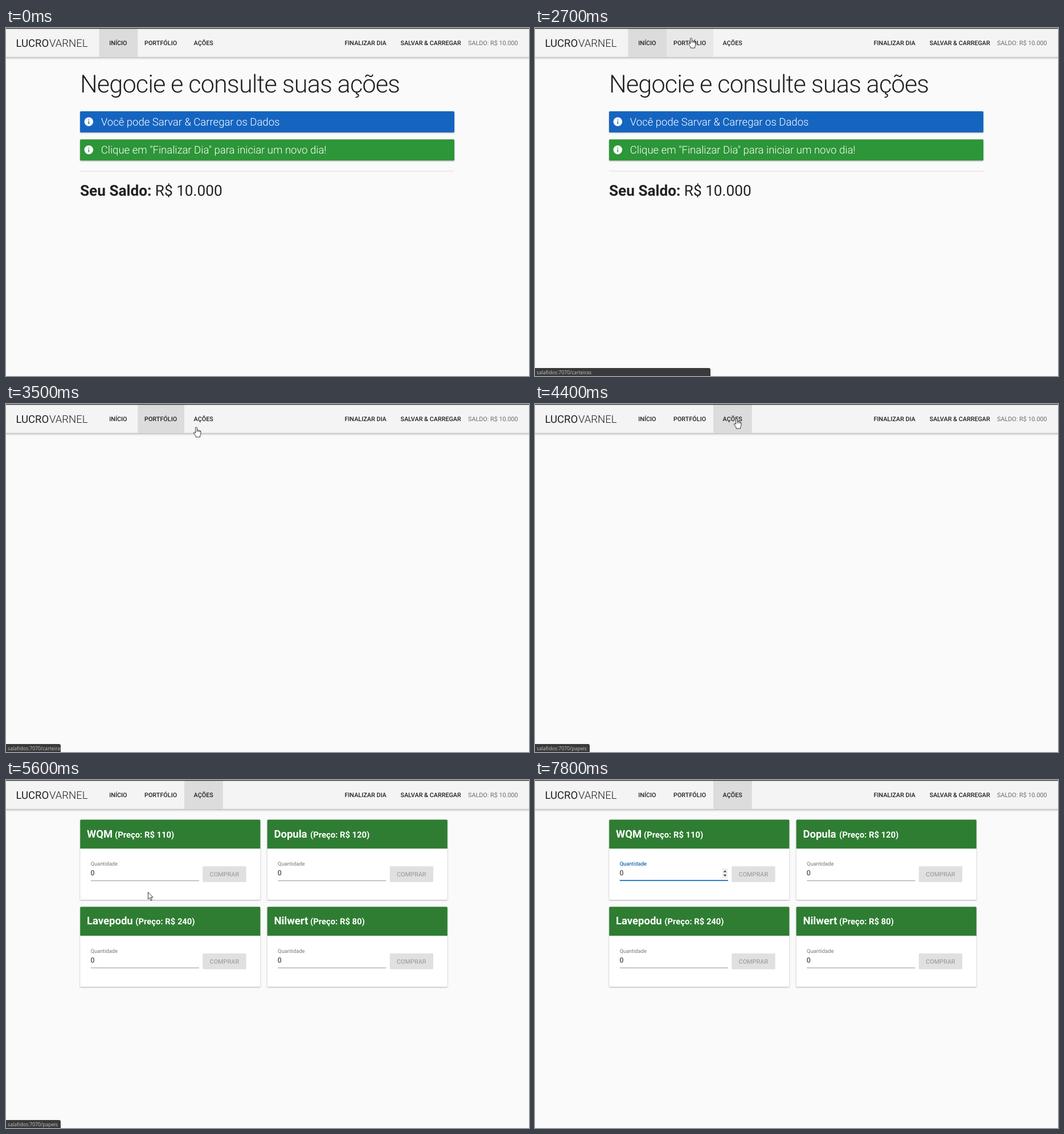
These frames come from a looping animation (918x610 px, 8000 ms). An HTML page:

```html
<!DOCTYPE html>
<html lang="pt">
<head>
<meta charset="utf-8">
<title>Carteira de ações</title>
<style>
html, body { margin: 0; width: 100%; height: 100%; overflow: hidden; background: #fafafa; }
#stage { position: relative; width: 918px; height: 610px; overflow: hidden; background: #fafafa; }
svg { position: absolute; left: 0; top: 0; font-family: Roboto, sans-serif; text-rendering: geometricPrecision; white-space: pre; }

.light { font-weight: 300; }
.bold { font-weight: 700; }
.ink { fill: #212121; }
.nav { font-size: 10.8px; font-weight: 500; }
.alert { font-size: 18.5px; font-weight: 300; fill: #fff; }
.name { font-size: 18.5px; font-weight: 700; fill: #fff; }
.price { font-size: 14.8px; font-weight: 700; fill: #fff; }
.label { font-size: 9.25px; fill: rgba(0,0,0,.54); }
.digit { font-size: 12.3px; fill: rgba(0,0,0,.87); }
.raised { filter: drop-shadow(0 1.4px 1px rgba(0,0,0,.32)); }
.bar { filter: drop-shadow(0 1.5px 2px rgba(0,0,0,.38)); }

/* 100 ms = 1.25% of the loop */
.home, .cards, .tab, .ripple, .cursor, .arrow, .hand, .focus, .line, .caret, .spin, .first,
#status, #status span { animation: 8s step-end infinite; }

.home { animation-name: leave; }
@keyframes leave {
  0% { opacity: 1; transform: none; }
  35% { opacity: .87; transform: translateY(-3px); }
  36.25% { opacity: .43; transform: translateY(-13.3px); }
  37.5%, 100% { opacity: 0; transform: translateY(-23px); }
}
.cards { animation-name: enter; }
@keyframes enter {
  0% { opacity: 0; transform: translateY(-23px); }
  56.25% { opacity: .46; transform: translateY(-12.5px); }
  57.5% { opacity: .84; transform: translateY(-3.5px); }
  58.75%, 100% { opacity: 1; transform: none; }
}

.tab { fill: #dcdcdc; }
.t1 { animation-name: tab1; }
@keyframes tab1 {
  0% { opacity: 1; }
  35% { opacity: .8; }
  36.25% { opacity: .38; }
  37.5%, 100% { opacity: 0; }
}
.t2 { animation-name: tab2; }
@keyframes tab2 {
  0% { opacity: 0; }
  33.75% { opacity: .5; }
  35% { opacity: 1; }
  52.5% { opacity: .75; }
  53.75% { opacity: .3; }
  55%, 100% { opacity: 0; }
}
.t3 { animation-name: tab3; }
@keyframes tab3 {
  0% { opacity: 0; }
  45% { opacity: .4; }
  46.25%, 100% { opacity: 1; }
}
.t4 { animation-name: tab4; }
@keyframes tab4 {
  0% { opacity: 0; }
  21.25% { opacity: .5; }
  22.5% { opacity: .17; }
  23.75%, 100% { opacity: 0; }
}
.ripple { fill: #a9a9a9; }
.r2 { animation-name: ripple2; }
@keyframes ripple2 {
  0% { opacity: 0; }
  35% { opacity: .5; }
  36.25% { opacity: 1; }
  37.5%, 100% { opacity: 0; }
}
.r3 { animation-name: ripple3; }
@keyframes ripple3 {
  0% { opacity: 0; }
  51.25% { opacity: .5; }
  52.5% { opacity: 1; }
  53.75% { opacity: .5; }
  55%, 100% { opacity: 0; }
}

.cursor { animation-name: path; }
@keyframes path {
  0% { transform: translate(17px, -14.5px); }
  6.25% { transform: translate(17px, -14.5px); animation-timing-function: steps(4); }
  11.25% { transform: translate(300px, 162px); animation-timing-function: steps(5); }
  17.5% { transform: translate(881px, 28px); }
  18.75% { transform: translate(881px, 28px); animation-timing-function: steps(3); }
  22.5% { transform: translate(741px, 52px); animation-timing-function: steps(3); }
  26.25% { transform: translate(440px, 53px); animation-timing-function: steps(2); }
  28.75% { transform: translate(254px, 30px); }
  30% { transform: translate(274px, 17px); }
  38.75% { transform: translate(274px, 17px); animation-timing-function: steps(4); }
  43.75% { transform: translate(334px, 40px); animation-timing-function: steps(2); }
  46.25% { transform: translate(354px, 25px); }
  65% { transform: translate(353px, 35px); }
  66.25% { transform: translate(353px, 35px); animation-timing-function: steps(3); }
  70% { transform: translate(249px, 196px); animation-timing-function: steps(4); }
  75%, 100% { transform: translate(157px, 163px); }
}
.arrow { animation-name: arrow; }
@keyframes arrow {
  0% { opacity: 1; }
  27.5% { opacity: 0; }
  67.5% { opacity: 1; }
  73.75%, 100% { opacity: 0; }
}
.hand { animation-name: hand; }
@keyframes hand {
  0% { opacity: 0; }
  27.5% { opacity: 1; }
  67.5%, 100% { opacity: 0; }
}

#status {
  position: absolute; left: 0; top: 596px; height: 14px; overflow: hidden;
  background: #3a3a3c; border-radius: 0 3px 0 0; color: #c4c4c4;
  font: 8.7px/16px "Open Sans", "Noto Sans", sans-serif; white-space: nowrap;
  animation-name: status;
}
#status span { position: absolute; left: 3px; top: 0; }
@keyframes status {
  0% { opacity: 0; width: 308px; }
  33.75% { opacity: 1; width: 308px; }
  40% { opacity: 1; width: 308px; animation-timing-function: steps(2); }
  42.5% { opacity: 1; width: 96px; }
  72.5% { opacity: .5; width: 96px; }
  73.75%, 100% { opacity: 0; width: 96px; }
}
#status .u1 { animation-name: url1; }
#status .u2 { animation-name: url2; }
@keyframes url1 { 0% { opacity: 1; } 45%, 100% { opacity: 0; } }
@keyframes url2 { 0% { opacity: 0; } 45%, 100% { opacity: 1; } }

.focus { fill: #1976d2; animation-name: focus; }
@keyframes focus {
  0% { opacity: 0; }
  78.75% { opacity: 0; animation-timing-function: steps(4); }
  83.75%, 100% { opacity: 1; }
}
.line { fill: #1976d2; transform-box: fill-box; transform-origin: center; animation-name: line; }
@keyframes line {
  0% { transform: scaleX(0); }
  78.75% { transform: scaleX(0); animation-timing-function: steps(4); }
  83.75%, 100% { transform: scaleX(1); }
}
.caret { animation-name: caret; }
@keyframes caret { 0% { opacity: 0; } 77.5% { opacity: 1; } 83.75%, 100% { opacity: 0; } }
.spin { animation-name: spin; }
@keyframes spin { 0% { opacity: 0; } 75%, 100% { opacity: 1; } }
.first { animation-name: digit; }
@keyframes digit { 0% { opacity: 1; } 91.25% { opacity: 0; } 96.25%, 100% { opacity: 1; } }
</style>
</head>
<body>
<div id="stage">
<svg width="918" height="610" viewBox="0 0 918 610">
  <defs>
    <g id="info">
      <circle r="7.8" fill="#fff"/>
      <path d="M-.8-3.9h1.6v1.6h-1.6zM-.8-.8h1.6v4.7h-1.6z"/>
    </g>
    <g id="card">
      <rect class="raised" width="316.2" height="140.4" rx="1.5" fill="#fff"/>
      <path d="M0 50.7V1.5Q0 0 1.5 0H314.7Q316.2 0 316.2 1.5V50.7Z" fill="#2e7d32"/>
      <text class="label" x="18.5" y="80.8">Quantidade</text>
      <rect x="18.6" y="106.6" width="190.2" height="1" fill="#000" fill-opacity=".42"/>
      <rect x="215" y="81.7" width="76.4" height="27.8" rx="1.5" fill="#e0e0e0"/>
      <text class="nav" x="253.2" y="99.5" text-anchor="middle" fill="#000" fill-opacity=".27">COMPRAR</text>
    </g>
  </defs>

  <g class="home">
    <text class="light ink" x="130" y="113.3" font-size="43.2" letter-spacing="-.864">Negocie e consulte suas ações</text>
    <rect class="raised" x="130" y="146" width="657" height="37" rx="1.5" fill="#1565c0"/>
    <use href="#info" x="145.3" y="164.3" fill="#1565c0"/>
    <text class="alert" x="166.8" y="170.7">Você pode Sarvar &amp; Carregar os Dados</text>
    <rect class="raised" x="130" y="195.2" width="657" height="37" rx="1.5" fill="#2d9638"/>
    <use href="#info" x="145.3" y="213.6" fill="#2d9638"/>
    <text class="alert" x="166.8" y="220">Clique em "Finalizar Dia" para iniciar um novo dia!</text>
    <rect x="130" y="250.4" width="657" height="1" fill="#000" fill-opacity=".12"/>
    <text class="bold ink" x="130" y="294" font-size="26.2">Seu Saldo:</text>
    <text class="ink" x="261.8" y="294" font-size="26.2">R$ 10.000</text>
  </g>

  <g class="cards">
    <use href="#card" x="130.2" y="69.5"/>
    <use href="#card" x="458.6" y="69.5"/>
    <use href="#card" x="130.2" y="222.2"/>
    <use href="#card" x="458.6" y="222.2"/>
    <text class="name" x="142" y="100.6">WQM</text>
    <text class="price" x="191" y="100.6">(Preço: R$ 110)</text>
    <text class="name" x="470.4" y="100.6">Dopula</text>
    <text class="price" x="534" y="100.6">(Preço: R$ 120)</text>
    <text class="name" x="142" y="253.3">Lavepodu</text>
    <text class="price" x="227.3" y="253.3">(Preço: R$ 240)</text>
    <text class="name" x="470.4" y="253.3">Nilwert</text>
    <text class="price" x="534" y="253.3">(Preço: R$ 80)</text>
    <text class="digit first" x="148.4" y="167.4">0</text>
    <text class="digit" x="476.8" y="167.4">0</text>
    <text class="digit" x="148.4" y="320.1">0</text>
    <text class="digit" x="476.8" y="320.1">0</text>

    <text class="label focus" x="148.7" y="150.3" style="fill:#1976d2">Quantidade</text>
    <rect class="line" x="148.8" y="175.2" width="190.2" height="1.8"/>
    <rect class="caret" x="156" y="156" width="1" height="15"/>
    <g class="spin">
      <rect x="328.5" y="155" width="9.8" height="17" fill="#efefef"/>
      <path d="M330.6 161.6l2.8-3.4 2.8 3.4zM330.6 165.8l2.8 3.4 2.8-3.4z" fill="#444"/>
    </g>
  </g>

  <rect class="bar" x="-8" y="0" width="934" height="50.8" fill="#f4f4f4"/>
  <rect class="tab t1" x="163.5" y="1" width="67.7" height="49.8"/>
  <rect class="tab t2" x="231.2" y="1" width="81.8" height="49.8"/>
  <rect class="tab t3" x="313" y="1" width="67.8" height="49.8"/>
  <rect class="tab t4" x="680.3" y="1" width="130.7" height="49.8"/>
  <rect class="ripple r2" x="231.2" y="1" width="81.8" height="49.8" rx="4"/>
  <rect class="ripple r3" x="313" y="1" width="67.8" height="49.8" rx="4"/>
  <rect width="918" height="1.4" fill="#39393b"/>

  <g class="ink">
    <text x="17.6" y="32.5" font-size="18.5">LUCRO</text>
    <text class="light" x="76" y="32.5" font-size="18.5">VARNEL</text>
    <g class="nav">
      <text x="181.2" y="30.3">INÍCIO</text>
      <text x="243" y="30.3">PORTFÓLIO</text>
      <text x="329.6" y="30.3">AÇÕES</text>
      <text x="594.4" y="30.3">FINALIZAR DIA</text>
      <text x="692.4" y="30.3">SALVAR &amp; CARREGAR</text>
    </g>
    <text x="811" y="30.3" font-size="10.8" fill="#6c6c6c">SALDO: R$ 10.000</text>
  </g>
</svg>

<div id="status">
  <span class="u1">salafidos:7070/carteiras</span>
  <span class="u2">salafidos:7070/papeis</span>
</div>

<svg width="918" height="610" viewBox="0 0 918 610">
  <g class="cursor" fill="#fff" stroke="#1c1c2a" stroke-width=".9" stroke-linejoin="round">
    <path class="arrow" d="M.4.6V13L3.2 10.4 5.2 15.3 7.3 14.4 5.2 9.6H9Z"/>
    <path class="hand" d="M-1.4 1.4Q0-.6 1.4 1.4V6Q2.8 5 4 6.4 5.4 5.7 6.3 7 8 6.6 8 8.6V12Q8 14 6.6 15.5V18H-.8V16.5L-4.4 11Q-4.9 9.4-3.2 9.2L-1.4 10.8ZM1.4 6V9M4 6.4V9M6.3 7V9.4"/>
  </g>
</svg>
</div>
</body>
</html>
```
